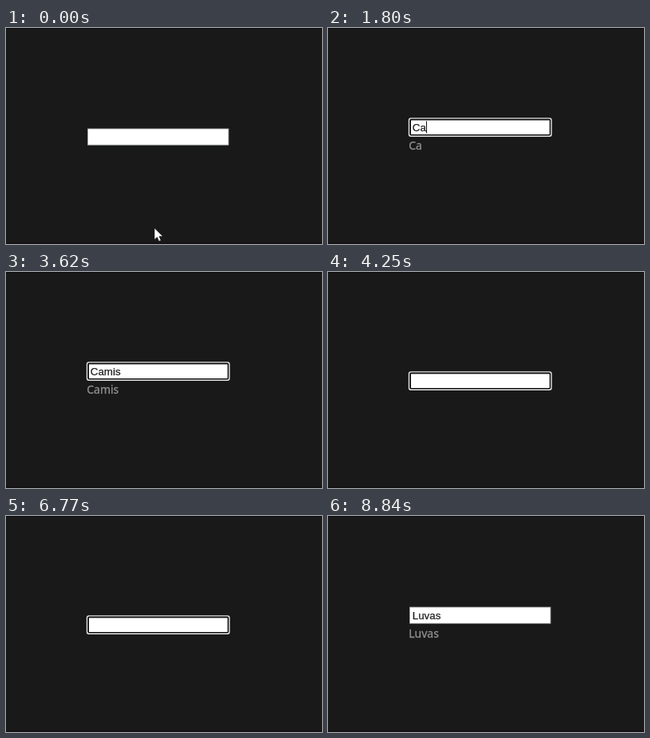
An HTML page that plays this animation: 396x270 px, repeating every 8.94 s.

```html
<!DOCTYPE html>
<html lang="pt">
<head>
<meta charset="utf-8">
<title>Typing demo</title>
<style>
  html, body { margin: 0; width: 100%; height: 100%; overflow: hidden; background: #191919; }
  #stage { position: relative; width: 396px; height: 270px; overflow: hidden; background: #191919; }
  svg { display: block; width: 396px; height: 270px; }
  #typed { font: 13.333px "Liberation Sans", Arial, sans-serif; fill: #222; stroke: #222; stroke-width: .25px; }
  #echo { font: 14px "Noto Sans", "Open Sans", sans-serif; fill: #909090; stroke: #909090; stroke-width: .3px; }
  #plain { fill: #fff; stroke: #a2a4a6; stroke-width: .8px; }
</style>
</head>
<body>
<div id="stage">
  <svg viewBox="0 0 396 270">
    <rect width="396" height="1" fill="#0c0c0c"/>
    <rect y="268" width="396" height="2" fill="#151114"/>
    <g id="field">
      <rect id="plain" x="102.5" y="126" width="176.4" height="20.2"/>
      <g id="ring">
        <rect x="100.8" y="124.2" width="179.8" height="23.7" rx="3" fill="#e6e6e6"/>
        <rect x="102.2" y="125.6" width="177" height="20.9" rx="2" fill="#101010"/>
        <rect x="104" y="127.4" width="173.6" height="17.6" fill="#fff"/>
      </g>
      <text id="typed" x="105.8" y="140.6"></text>
      <rect id="caret" y="128.5" width="1" height="15" fill="#111"/>
    </g>
    <text id="echo" x="101.2" y="152.2"></text>
    <path id="arrow" d="M0 0V14.5L3.4 11.4L5.7 16.6L8.2 15.5L6 10.5H10.6Z" fill="#fff" stroke="#111" stroke-width=".6"/>
    <path id="beam" d="M-3 -7.5H-1L0 -6.5L1 -7.5H3M0 -6.5V6.5M-3 7.5H-1L0 6.5L1 7.5H3" fill="none" stroke="#222"/>
  </svg>
</div>
<script>
const LOOP = 8940, FOCUS = 870, BLUR = 8840;
const CARET_ON = 470, CARET_CYCLE = 1060;
const FIELD_TOP = 126, FIELD_HEIGHT = 20, LIFT = 12;

// [time, field text, caret hidden while the key repeats]
const keys = [
  [FOCUS, ""], [1310, "C"], [1600, "Ca"],
  [2170, "Cam"], [2260, "Cami"], [2360, "Camis"], [2460, "Camise"], [2590, "Camiset"], [2730, "Camiseta"],
  [3090, "Camiset"], [3420, "Camise"], [3620, "Camis", true], [3680, "Cam", true], [3730, "C", true], [3780, ""],
  [4780, "B"], [5030, "Bl"], [5130, "Blus"], [5220, "Blusa"],
  [5860, "Blus"], [6140, "Blu"], [6220, "B"], [6300, ""],
  [6910, "L"], [7060, "Lu"], [7200, "Luv"], [7330, "Luva"], [7560, "Luvas"]
];

// [start, end, from, to, hidden after]
const moves = [
  [120, 800, [186, 250], [190, 136], 1310],
  [8160, 8690, [190, 124], [188, 280], LOOP]
];

const el = id => document.getElementById(id);
const [field, ring, typed, caret, echo, arrow, beam] =
  ["field", "ring", "typed", "caret", "echo", "arrow", "beam"].map(el);
const show = (node, on) => { node.style.visibility = on ? "visible" : "hidden"; };
const place = (node, x, y) => node.setAttribute("transform", `translate(${x} ${y})`);
const ease = p => p * p * (3 - 2 * p);

function drawField(t) {
  const [time, value, repeating] = keys.filter(k => k[0] <= t).pop() || [0, ""];
  const focused = t >= FOCUS && t < BLUR;
  const lift = value ? LIFT : 0;
  place(field, 0, -lift);
  show(ring, focused);
  typed.textContent = echo.textContent = value;
  const width = value ? typed.getComputedTextLength() : 0;
  caret.setAttribute("x", Math.round(106 + width));
  show(caret, focused && !repeating && (t - time) % CARET_CYCLE < CARET_ON);
  return FIELD_TOP - lift;
}

function drawPointer(t, top) {
  const move = t < moves[0][4] ? moves[0] : t >= moves[1][0] ? moves[1] : null;
  show(arrow, false);
  show(beam, false);
  if (!move) return;
  const [start, end, from, to] = move;
  const p = ease(Math.min(1, Math.max(0, (t - start) / (end - start))));
  const [x, y] = from.map((v, i) => v + (to[i] - v) * p);
  const node = y > top && y < top + FIELD_HEIGHT ? beam : arrow;
  place(node, x, y);
  show(node, true);
}

const begin = performance.now();
function frame() {
  const t = (performance.now() - begin) % LOOP;
  drawPointer(t, drawField(t));
  requestAnimationFrame(frame);
}
frame();
</script>
</body>
</html>
```
